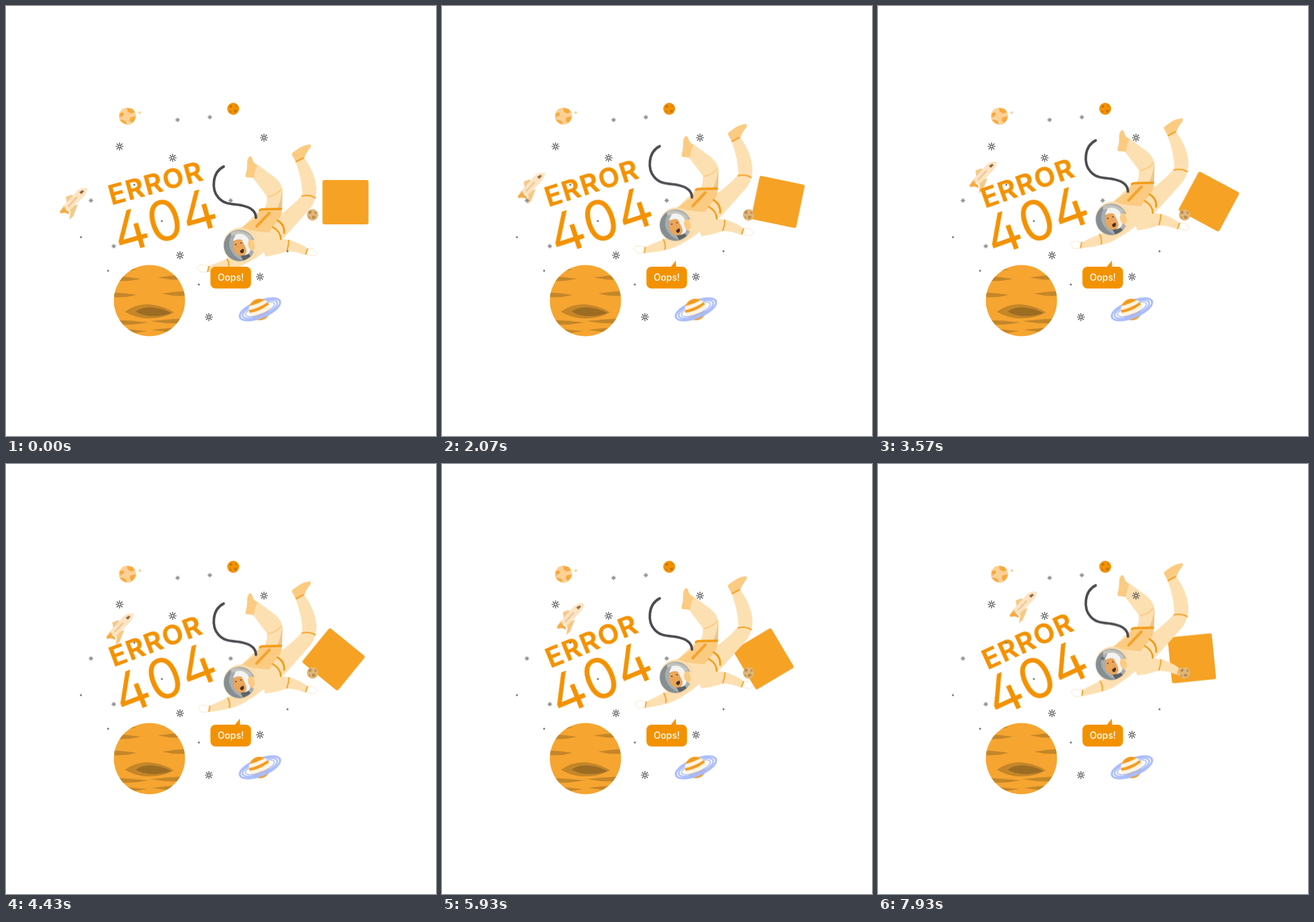
An HTML page for the animation above (8000 ms loop, 640x640 px).

```html
<!DOCTYPE html>
<html lang="en">
<head>
<meta charset="utf-8">
<title>Error 404</title>
<style>
  html, body { margin: 0; width: 100%; height: 100%; overflow: hidden; background: #fff; }
  svg { display: block; width: 100vw; height: 100vh; }
  text { font-family: Inter, "Open Sans", sans-serif; text-anchor: middle; }
  .line { fill: none; stroke-linecap: round; }
  .o { fill: #f39200; }
  .suit { fill: #fde0b2; }
  .tan { fill: #fbcb82; }
  .band { fill: none; stroke: #f5a32c; stroke-width: 2; }
</style>
</head>
<body>
<svg viewBox="0 0 640 640">
  <defs>
    <clipPath id="disc"><circle cx="213.5" cy="438.5" r="53"/></clipPath>
    <clipPath id="glass"><circle cx="347.5" cy="356.5" r="23"/></clipPath>
    <clipPath id="ball"><circle cx="377.5" cy="451.5" r="16"/></clipPath>
  </defs>

  <g id="shuttle">
    <path fill="#f5c987" d="M90 284L98 281L104 283L92 296ZM81 306L87 297L97 306L95 318L101 313L108 295L98 299Z"/>
    <path fill="#f5ac45" d="M81 306L87 300L95 307L94 310Q88 306 83 309Z"/>
    <path fill="#fde3c0" d="M122 271Q112 270 106 276L87 297L95 305L115 285Q121 279 122 271Z"/>
    <path fill="#8b6844" d="M110 277L115 274L117 276L113 280Z"/>
    <path class="line" stroke="#e9c391" stroke-width="2" stroke-dasharray="1.5 1" d="M94 298L106 285"/>
  </g>

  <g id="error"><text class="o" x="1" y="15" font-size="41" font-weight="700" letter-spacing="1.5">ERROR</text></g>
  <g id="code"><text class="o" y="30" font-size="82.500" font-weight="400" style="font-feature-settings:'cv02'">404</text></g>

  <g id="box"><rect x="-34.3" y="-33" width="68.6" height="66" rx="3" fill="#f6a224"/></g>

  <g id="astronaut">
    <!-- legs -->
    <path class="suit" d="M373 235L400 255Q411 264 412 276L411 306L382 306Q390 296 388 283L367 255Z"/>
    <path fill="#e8c791" d="M411 274L411 304L402 304Q409 292 411 274Z"/>
    <path class="tan" d="M362 224Q358 229 359 235Q359 243 357 250Q355 255 360 255L369 256Q370 246 374 237Q368 233 367 229Q366 223 362 224Z"/>
    <path class="band" style="stroke:#fbcb82" d="M390 284Q404 281 410 272"/>
    <path class="suit" d="M431 232L444 226Q460 248 462 270Q463 287 454 300L414 345L404 314Q428 296 441 281Q441 258 431 232Z"/>
    <path class="tan" d="M452 206Q443 207 437 211L427 218Q424 220 427 224L432 233L444 227Q446 219 453 211Q455 206 452 206Z"/>
    <path class="band" d="M431 232L443 226M440 283Q452 280 461 286"/>

    <g id="rightArm">
      <path class="suit" d="M378 352Q400 345 421 348Q437 352 449 361L446 371Q432 365 418 365Q402 371 386 373Z"/>
      <path fill="#fff" stroke="#f8dfbd" stroke-width=".8" d="M449 361L457 361Q464 366 463 369L459 372L447 370Z"/>
      <path class="band" d="M421 348Q421 356 418 365M449 361L446 370"/>
    </g>

    <g id="leftArm">
      <path class="suit" d="M302 387L330 376L361 363L380 364L374 374L352 386Q336 394 300 396Z"/>
      <path fill="#fff" stroke="#f8dfbd" stroke-width=".8" d="M302 387L291 385Q283 387 285 390L290 396L300 396Z"/>
      <path class="band" d="M329 376Q333 384 331 392M302 387L300 396"/>
    </g>

    <!-- torso and pack -->
    <path class="suit" d="M350 331L377 304L410 303Q416 325 414 345Q402 350 390 360Q378 374 364 377Z"/>
    <path class="tan" d="M349 331L370 316L380 303L410 302L409 313L391 337Q376 336 365 334Z"/>
    <path class="line" stroke="#f39a17" stroke-width="3.5" d="M378 304Q380 302 384 302.500L409 302"/>
    <path class="line" stroke="#f5a32c" stroke-width="4" stroke-linecap="butt" d="M373 328L392 308"/>
    <path class="line" stroke="#f39a17" stroke-width="2.6" d="M397 329Q409 336 409 347M404 319Q415 325 414 338"/>

    <!-- helmet -->
    <circle cx="349.5" cy="356" r="26" fill="#fbdcaa"/>
    <circle cx="347.5" cy="356.5" r="23.5" fill="#a9adac"/>
    <g clip-path="url(#glass)">
      <path fill="#858e92" d="M324 345Q332 334 342 335Q329 345 333 360Q338 374 353 379L340 384L322 370Z"/>
      <path fill="#c3c3be" d="M335 336Q354 332 366 344L362 350Q350 338 335 342Z"/>
      <path fill="#5d6265" d="M349 371L361 369L365 373L353 379Z"/>
      <path fill="#f3f3f1" d="M342 340Q354 336 361 347L364 362Q363 370 355 371L346 352L338 349Z"/>
      <path fill="#eba65b" d="M340 349Q346 346 351 348L356 358Q361 368 354 371Q346 373 341 367Q336 359 340 349Z"/>
      <path fill="#4a3027" d="M348 365Q352 360 354 362Q355 368 350 368ZM340 355L343 354L343 356ZM348 352L351 352L350 354Z"/>
    </g>
    <ellipse cx="367" cy="356" rx="6.5" ry="9" class="tan" transform="rotate(-25 367 356)"/>
    <path class="suit" d="M367 349Q378 347 382 357L375 367L367 365Q374 358 367 349Z"/>

    <path class="line" stroke="#4b4b50" stroke-width="3.8" d="M324 239C306 248 306 274 316 285C326 297 340 294 352 297C365 300 372 306 372 315"/>
  </g>

  <!-- large planet -->
  <circle cx="213.5" cy="438.5" r="53" fill="#f6a531"/>
  <g clip-path="url(#disc)">
    <g id="stripes" fill="#c48628"></g>
    <path fill="#c48628" d="M177 455Q197 441 220 445Q238 448 250 456Q232 466 208 465Q190 463 177 455Z"/>
    <path fill="#9c6c22" d="M193 455Q204 447 220 449Q236 451 246 457Q229 463 211 461Q202 460 193 455Z"/>
  </g>

  <!-- ringed planet -->
  <g transform="rotate(-22 378 451.5)">
    <g id="ringBack" class="line" stroke="#a8bbfb"></g>
    <circle cx="377.5" cy="451.5" r="16" fill="#fff4e2"/>
    <path clip-path="url(#ball)" fill="#f29a1d" d="M358 434H398V440Q376 444 358 440ZM360 446Q378 450 396 445V449Q376 455 360 450ZM358 459Q378 456 398 460V470H358Z"/>
    <g id="ringFront" class="line" stroke="#a8bbfb"></g>
  </g>

  <!-- small planets -->
  <circle cx="180.8" cy="164" r="12.8" fill="#fdd195"/>
  <path fill="#f6aa3e" d="M180 152L188 153L192 158L186 160L181 157ZM169 160L174 158L176 162L170 166ZM171 169L178 171L180 176Q173 174 170 170ZM185 166L193 164Q192 171 187 174L184 170Z"/>
  <circle cx="199" cy="158.7" r="2" fill="#fdd195"/>
  <circle cx="338.2" cy="153" r="8.9" fill="#f39200"/>
  <path fill="#c57706" d="M332 149L335 147L337 150L334 152ZM341 147L344 149L342 151ZM339 155L344 154L343 158L340 159ZM332 156L335 156L336 159Z"/>
  <circle cx="456.3" cy="311" r="8.4" fill="#e2b676"/>
  <path fill="#b98c50" d="M450 306L454 304L455 308L451 310ZM459 305L463 308L460 310ZM456 312L461 313L459 317L455 316ZM450 313L453 314L452 317Z"/>

  <!-- speech bubble -->
  <rect class="o" x="304.3" y="388" width="60.400" height="32.5" rx="7.5"/>
  <path class="o" id="tail" d="M340 389L348 379L348.500 389Z"/>
  <text x="334.500" y="408.500" font-size="13.800" font-weight="500" fill="#fff">Oops!</text>

  <g id="stars" stroke="#46474b"></g>
</svg>

<script>
const LOOP = 8000;
const $ = id => document.getElementById(id);
const add = (parent, tag, attrs) => {
  const el = document.createElementNS("http://www.w3.org/2000/svg", tag);
  for (const key in attrs) el.setAttribute(key, attrs[key]);
  $(parent).append(el);
};

// Bands taper inwards from both edges of the large planet
for (const y of [391, 405, 429, 470, 483]) {
  for (const side of [-1, 1]) {
    const edge = 213.5 + side * 56, tip = 213.5 + side * (10 + 9 * Math.sin(y));
    const mid = (edge + tip) / 2, top = y - side;
    add("stripes", "path", {
      d: `M${edge} ${top - 4}Q${mid} ${top - 3} ${tip} ${top}Q${mid} ${top + 5} ${edge} ${top + 3}Z`
    });
  }
}

for (let i = 0; i < 3; i++) {
  const rx = 32 - i * 4.5, ry = 12 - i * 2.3, width = 3 - i * .7;
  const half = sweep => `M${378 - rx} 451.5A${rx} ${ry} 0 0 ${sweep} ${378 + rx} 451.5`;
  add("ringBack", "path", { d: half(1), "stroke-width": width });
  add("ringFront", "path", { d: half(0), "stroke-width": width });
}

const star = (x, y, r) => {
  let d = "";
  for (let a = 0; a < 2 * Math.PI - .1; a += Math.PI / 4) {
    const c = r * Math.cos(a), s = r * Math.sin(a);
    d += `M${x + c * .2} ${y + s * .2}L${x + c} ${y + s}`;
  }
  add("stars", "path", { d, "stroke-width": .4 + r / 8 });
};
const dot = (cx, cy) => add("stars", "circle", { cx, cy, r: 1.5, fill: "#77787b", stroke: "none" });

[[169, 209], [248, 226], [384, 196], [259, 371], [378, 403], [302, 463]].forEach(([x, y]) => star(x, y, 6));
[[255, 169], [303, 165], [334, 289], [126, 289], [160, 357]].forEach(([x, y]) => star(x + .4, y + .5, 3.2));
[[111.5, 344], [152, 394], [287, 414.5], [419, 365], [232, 320], [191, 266]].forEach(p => dot(...p));

const pose = (x, y, angle = 0) => `translate(${x}px,${y}px) rotate(${angle}deg)`;
const move = (id, from, to, easing = "linear") => $(id).animate(
  [{ transform: pose(...from), easing }, { transform: pose(...to) }],
  { duration: LOOP, iterations: Infinity }
);

move("shuttle", [-1, 0], [115.5, -81.5], "cubic-bezier(.33,.35,.7,.78)");
move("error", [222, 263.5, -15.2], [222, 263.5, -24.6]);
move("code", [236, 319, -15.8], [235.5, 318.5, -25]);
move("box", [505.3, 292, 0], [466.8, 289.2, 85], "cubic-bezier(.3,.02,.7,.7)");

$("leftArm").style.transformOrigin = "375px 366px";
$("rightArm").style.transformOrigin = "386px 360px";
move("leftArm", [0, 0], [0, 0, -6]);
move("rightArm", [0, 0], [0, 0, 1.5]);

// Rise, sink a little, rise again
$("astronaut").animate([
  { offset: 0, transform: pose(0, 0) },
  { offset: 3000 / LOOP, transform: pose(0, -44) },
  { offset: 4800 / LOOP, transform: pose(0, -28) },
  { offset: 1, transform: pose(0, -59) }
], { duration: LOOP, iterations: Infinity });

$("tail").animate([
  { opacity: 0, offset: 0, easing: "step-end" },
  { opacity: 1, offset: 70 / LOOP },
  { opacity: 1, offset: 1 }
], { duration: LOOP, iterations: Infinity });
</script>
</body>
</html>
```
